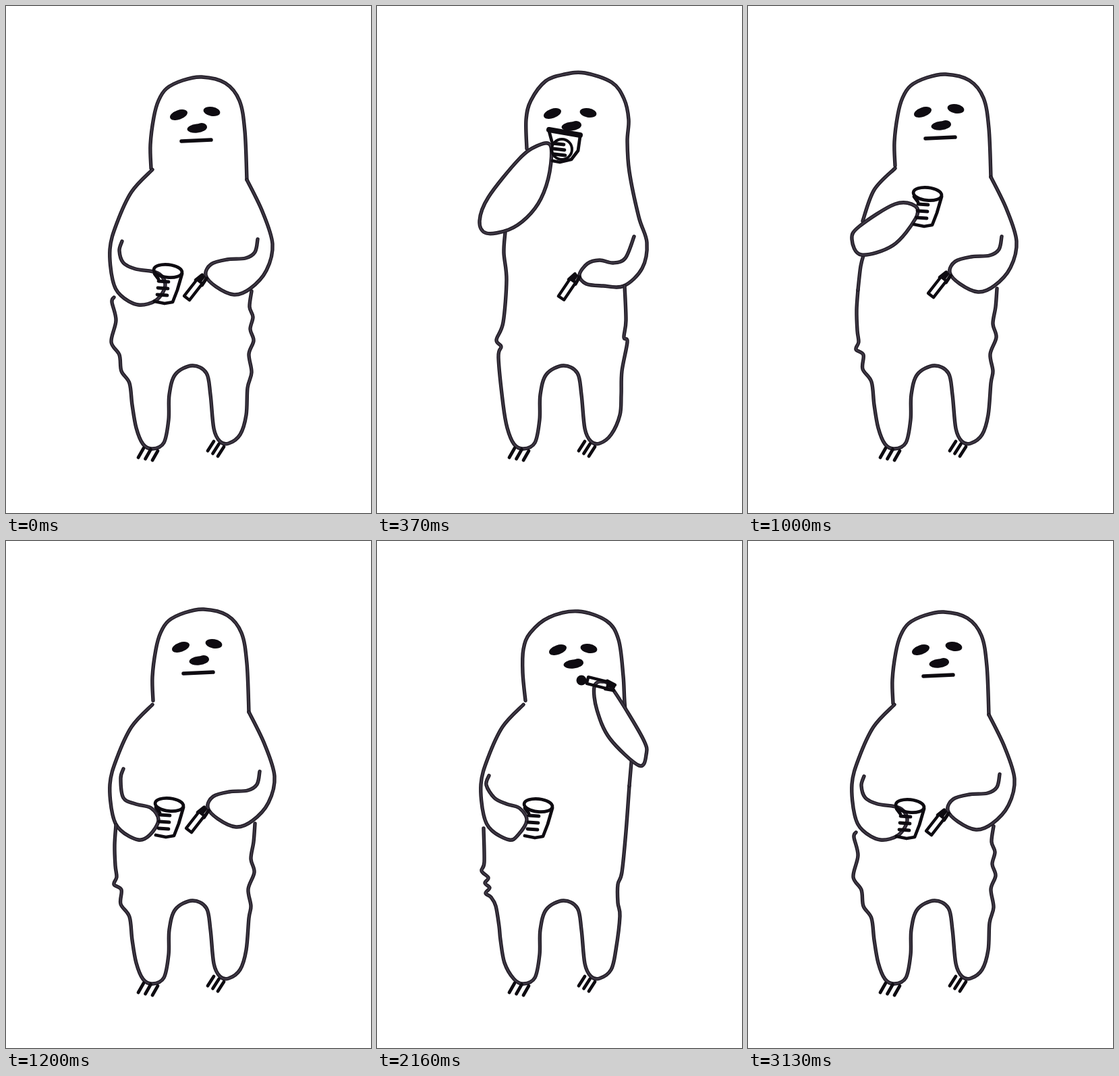
These frames come from a looping animation (541 by 750 pixels, 3.23 s). An HTML page with a canvas:

```html
<!DOCTYPE html>
<html lang="en">
<head>
<meta charset="utf-8">
<title>Sloth</title>
<style>
html, body { margin: 0; height: 100%; overflow: hidden; background: #fff; }
canvas { display: block; }
</style>
</head>
<body>
<canvas id="stage" width="541" height="750"></canvas>
<script>
const ctx = document.getElementById('stage').getContext('2d');
const INK = '#0e0b11';
ctx.lineCap = ctx.lineJoin = 'round';

// Smooth curve through "x,y x,y ..." key points
function curve(text, closed) {
  const pts = text.split(' ').map(p => p.split(',').map(Number));
  const n = pts.length;
  const at = i => closed ? pts[(i + n) % n] : pts[Math.max(0, Math.min(n - 1, i))];
  const path = new Path2D();
  path.moveTo(...pts[0]);
  for (let i = 0; i < (closed ? n : n - 1); i++) {
    const [a, b, c, d] = [at(i - 1), at(i), at(i + 1), at(i + 2)];
    path.bezierCurveTo(
      b[0] + (c[0] - a[0]) / 6, b[1] + (c[1] - a[1]) / 6,
      c[0] - (d[0] - b[0]) / 6, c[1] - (d[1] - b[1]) / 6, ...c);
  }
  return path;
}

function stroke(path, color, width) {
  ctx.strokeStyle = color;
  ctx.lineWidth = width;
  ctx.stroke(path);
}

// Felt-tip outline: dark edges, paler core
function felt(text, closed) {
  const path = curve(text, closed);
  if (closed) { ctx.fillStyle = '#fff'; ctx.fill(path); }
  stroke(path, '#211c26', 5.4);
  stroke(path, '#3d3743', 2.4);
}

const pen = (d, width = 4.8) => stroke(new Path2D('M' + d), INK, width);

function oval(x, y, rx, ry, deg = 0, outline = 0) {
  const path = new Path2D();
  path.ellipse(x, y, rx, ry, deg * Math.PI / 180, 0, 7);
  ctx.fillStyle = INK;
  if (outline) stroke(path, INK, outline);
  else ctx.fill(path);
}

function moved(x, y, deg, draw) {
  ctx.save();
  ctx.translate(x, y);
  ctx.rotate(deg * Math.PI / 180);
  draw();
  ctx.restore();
}

// Row of three equal strokes
function claws(x, y, stepX, stepY, dx, dy, width) {
  for (let i = 0; i < 3; i++) pen(`${x + i * stepX},${y + i * stepY}l${dx},${dy}`, width);
}

function face(leftX, leftY, rightX, rightY, noseX, noseY) {
  oval(leftX, leftY, 13.5, 7, -19);
  oval(rightX, rightY, 12.5, 6.8, 10);
  oval(noseX, noseY, 14.5, 6.5, -6);
  oval(noseX + 7, noseY - 2, 8, 6);
}

function cup(x, y, width) {
  oval(x, y, 21, 9.5, 6, 4.8);
  pen(`${x + 21},${y + 4}l-7,24 -7,18 -12,2 -15,-3`, width);
  pen(`${x - 20},${y + 4}l6,8`);
  claws(x - 14, y + 15, -1, 10, 15, 1, width);
}

function stick(x, y, deg) {
  moved(x, y, deg, () => {
    pen('0,-5L0,5 31,5 31,-5Z', 4.4);
    pen('29,-6L41,-3M29,6L41,5M32,0L40,0', 5);
  });
}

// Both legs in one line, between the two flanks; dx and width shift the outer thighs
function legs(left, right, leftDx = 0, rightDx = 0) {
  felt(`${left} ${187 + leftDx},590 ${193 + leftDx},624 203,648 217,655 234,646 241,612 242,575 251,545 276,532 297,543 303,575 308,625 317,644 330,647 347,634 ${356 + rightDx},605 ${right}`);
  claws(204, 654, 10.5, 2, -8, 14);
  claws(308, 644, 7.5, 4, -9, 14);
}

const standLegs = () => legs(
  '163,420 161,450 162,480 164,497 160,508 171,516 170,537 183,556',
  '360,558 363,540 359,515 368,490 363,470 367,445 369,418');

const turnedLegs = () => legs(
  '158,425 159,475 155,488 165,498 160,506 167,513 161,521 169,527 176,540 181,570',
  '360,555 357,535 357,508 363,490 369,430 374,362', -4, -2);

function leftArm(tipX, tipY, handX) {
  felt(`217,242 186,275 164,322 154,360 158,405 170,428 196,442 ${handX - 13},435 ${handX},413 ${handX - 11},395 192,389 174,380 ${tipX - 4},${tipY + 14} ${tipX},${tipY}`);
}

function upright() {
  felt('215,240 214,205 219,165 226,140 238,122 262,110 290,105 325,114 346,140 354,185 357,257');
  felt('357,257 380,304 395,352 386,391 362,418 338,427 311,415 296,398 304,382 328,375 355,373 369,364 373,345');
  face(256, 161, 305, 156, 283, 181);
  pen('260,200L304,198', 5.5);
  stick(268, 432, -52);
}

function rest() {
  upright();
  leftArm(172, 348, 236);
  cup(240, 392);
  legs('160,431 157,438 163,465 156,497 168,516 171,540 183,558',
    '358,565 364,542 360,515 367,495 362,478 366,460 361,445 364,422');
}

function stand() {
  moved(3, -4, 0, upright);
  leftArm(174, 337, 226);
  cup(242, 390);
  standLegs();
}

function lift() {
  moved(3, -4, 0, upright);
  standLegs();
  felt('218,240 187,272 170,318');
  felt('172,366 167,385 163,420');
  felt('248,296 218,293 165,326 154,345 168,368 215,354 248,315', true);
  cup(266, 278);
}

function drink(tilt = 0) {
  felt('222,211 221,168 228,140 250,111 278,101 308,99 348,113 366,137 373,168 371,200 374,245 388,312 400,350 393,388 366,414 335,414 310,411 300,398 312,381 330,376 350,380 368,373 381,341');
  legs('190,335 188,365 192,405 187,468 177,494 184,504 180,520',
    '362,575 363,540 371,497 366,490 369,465 367,414', 0, 4);
  stick(273, 432, -56);
  face(260, 159, 313, 158, 288, 178);
  moved(168, 330, tilt, () => moved(-168, -330, 0, () => {
    felt('257,206 237,207 210,227 165,283 152,318 162,336 195,331 222,313 243,285 256,245', true);
    pen('255,183L278,187 301,191', 8);
    pen('301,193L298,214 288,227 271,231 260,229M255,185L259,200');
    oval(274, 212, 15, 15, 0, 4);
    claws(260, 203, 1, 8, 17, 2);
  }));
}
const tip = () => drink(-2);

function turned(width) {
  felt('220,236 216,195 217,160 227,136 255,113 298,104 340,118 358,146 365,200 368,250 378,316');
  leftArm(166, 347, 222);
  cup(239, 391, width);
  turnedLegs();
  face(268, 161, 314, 159, 291, 182);
}

function hold() {
  felt('290,312 298,299 320,298 370,313 394,340 375,361 325,348 294,328', true);
  stick(247, 295, 13);
}

function raise() {
  turned();
  hold();
  pen('278,205L290,203 306,199', 5.5);
}

const openMouth = () => oval(303, 206, 7.5, 7.5);

function exhale() {
  turned(5.8);
  hold();
  openMouth();
}

function puff() {
  turned();
  felt('378,316 374,362');
  felt('322,216 334,208 350,220 394,292 399,316 388,332 345,292 326,250', true);
  stick(312, 206, 14);
}

function inhale() {
  puff();
  openMouth();
}

const timeline = [
  [0, rest], [170, lift], [370, drink], [470, tip], [640, drink], [770, tip],
  [870, drink], [1000, lift], [1200, stand], [1730, raise], [1930, puff],
  [2160, inhale], [2590, exhale], [2720, inhale], [2890, exhale],
  [2970, raise], [3050, stand], [3130, rest]
];
const LOOP = 3230;
const start = performance.now();

function draw() {
  const time = (performance.now() - start) % LOOP;
  const [, pose] = timeline.findLast(([from]) => from <= time);
  ctx.fillStyle = '#fff';
  ctx.fillRect(0, 0, 541, 750);
  pose();
  requestAnimationFrame(draw);
}
draw();
</script>
</body>
</html>
```
